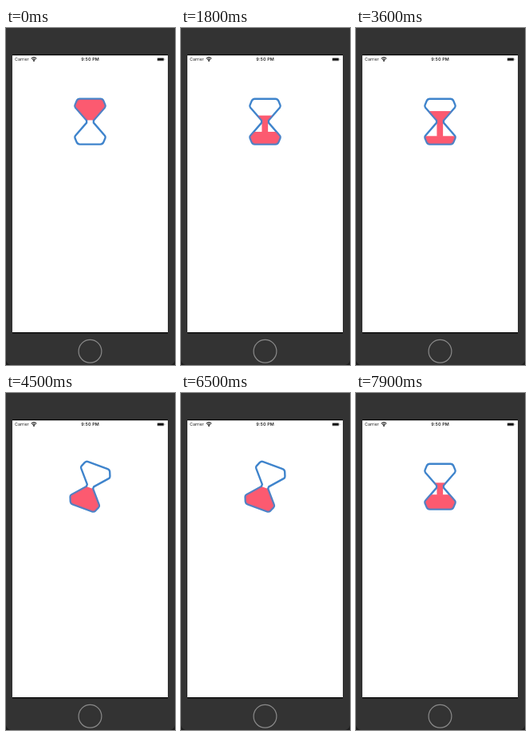
Write an HTML page that moves like this. It is 212 px wide and 422 px high and loops after 8000 ms.

```html
<!DOCTYPE html>
<html lang="en">
<head>
<meta charset="utf-8">
<title>Hourglass loader</title>
<style>
  html, body { margin: 0; width: 100%; height: 100%; overflow: hidden; background: #333; }
  svg { display: block; width: 212px; height: 422px; }
  text { font-family: Inter, Roboto, sans-serif; fill: #222; }
  .sand { fill: #fc5a70; }
  .glass { fill: none; stroke: #3f84cc; stroke-width: 2.4; stroke-linejoin: round; }
  .tint { opacity: .3; }
</style>
</head>
<body>
<svg viewBox="0 0 212 422">
  <defs>
    <path id="outline" d="M-13-28.4H13Q15.6-28.4 16.8-25.9L19-20.6Q19.6-19 18.4-17.5L4.4-1.4V1.4L18.4 17.5Q19.6 19 19 20.6L16.8 25.9Q15.6 28.4 13 28.4H-13Q-15.6 28.4-16.8 25.9L-19 20.6Q-19.6 19-18.4 17.5L-4.4 1.4V-1.4L-18.4-17.5Q-19.6-19-19-20.6L-16.8-25.9Q-15.6-28.4-13-28.4Z"/>
    <clipPath id="inside"><use href="#outline"/></clipPath>
  </defs>

  <!-- phone -->
  <path d="M0 416Q1 421 6 422H0ZM212 416Q211 421 206 422H212Z" fill="#1d1d1d"/>
  <rect x="8" y="33" width="195" height="349.3" fill="#000"/>
  <rect x="8" y="34.3" width="195" height="346.7" fill="#fff"/>
  <circle cx="105.5" cy="404.8" r="14.4" fill="none" stroke="#8a8a8a" stroke-width="1.2"/>

  <!-- status bar -->
  <text x="11" y="41.3" font-size="5.4">Carrier</text>
  <g fill="none" stroke="#111" stroke-width="1.1">
    <path d="M31.7 38.4Q35 35.4 38.3 38.4M33.1 39.8Q35 38.1 36.9 39.8"/>
    <circle cx="35" cy="41" r=".4"/>
  </g>
  <text x="105.5" y="41.3" font-size="5.4" font-weight="600" letter-spacing=".12" text-anchor="middle">9:50 PM</text>
  <rect x="189.4" y="37.2" width="9" height="4.2" rx="1.2" fill="none" stroke="#999" stroke-width=".4"/>
  <rect x="190" y="37.8" width="7.8" height="3" rx=".6" fill="#111"/>
  <rect x="198.8" y="38.6" width=".5" height="1.4" fill="#777"/>

  <!-- hourglass -->
  <g transform="translate(105.5 117.2)">
    <g id="turner">
      <g id="sand" class="sand" clip-path="url(#inside)">
        <rect id="upper" x="-21" width="42"/>
        <rect id="stream" x="-4" width="7.6"/>
        <rect id="lower" x="-21" width="42"/>
      </g>
      <use href="#outline" class="glass"/>
      <use href="#sand" class="tint"/>
    </g>
  </g>
</svg>
<script>
  const LOOP = 8000, LEAD = 1000, CYCLE = 2000;
  const EDGE = 29, NECK = 2, OVERLAP = .5;
  const $ = id => document.getElementById(id);
  const progress = (t, from, to) => Math.min(1, Math.max(0, (t - from) / (to - from)));
  const mix = (a, b, k) => a + (b - a) * k;
  const easeInOut = k => k < .5 ? 2 * k * k : 1 - 2 * (1 - k) * (1 - k);

  function span(id, top, bottom) {
    $(id).setAttribute('y', top);
    $(id).setAttribute('height', Math.max(0, bottom - top));
  }

  function draw(time) {
    const t = time < LEAD ? 0 : (time - LEAD) % CYCLE;
    const upper = mix(-EDGE, -NECK, progress(t, 30, 1000));
    const lower = mix(EDGE, NECK, progress(t, 200, 1200));
    const head = mix(-NECK, EDGE, progress(t, 30, 200));
    const tail = mix(-NECK, NECK, progress(t, 1000, 1200));

    span('upper', upper, -NECK);
    span('stream', tail - OVERLAP, Math.min(head, lower + OVERLAP));
    span('lower', lower, EDGE);

    const angle = 180 * easeInOut(progress(t, 1430, 1730));
    $('turner').setAttribute('transform', `rotate(${angle})`);
  }

  const start = performance.now();
  function frame() {
    draw((performance.now() - start) % LOOP);
    requestAnimationFrame(frame);
  }
  frame();
</script>
</body>
</html>
```
